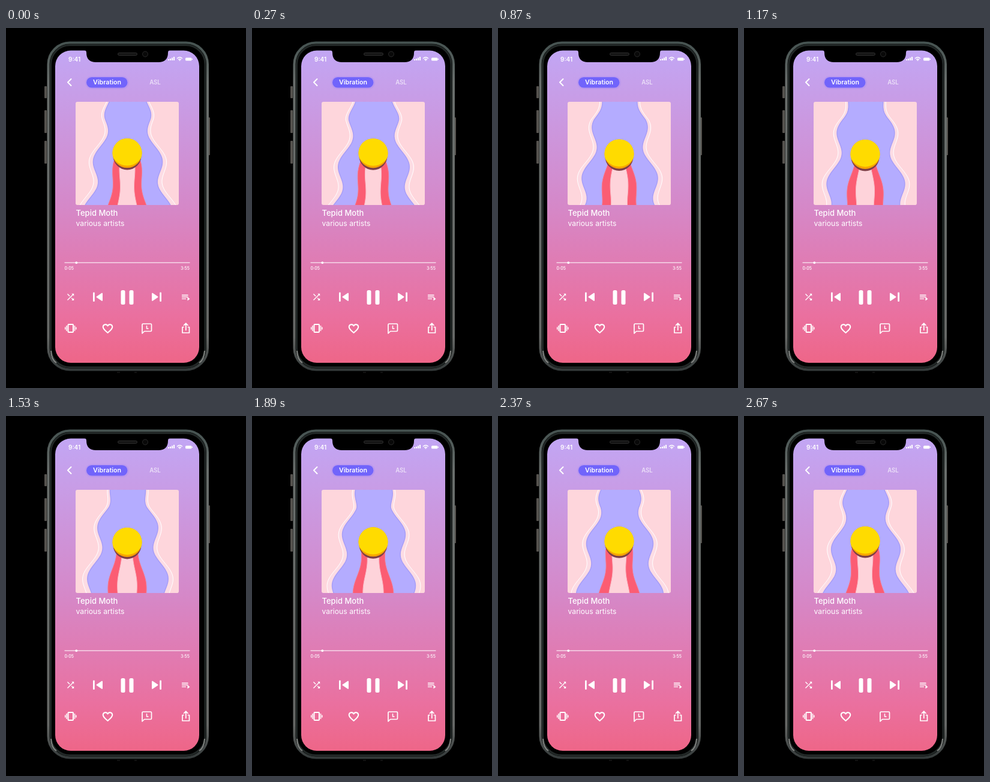
Animation of 400 by 600 pixels, one loop 2.7 s. Source, as an HTML page:

```html
<!DOCTYPE html>
<html lang="en">
<head>
<meta charset="utf-8">
<title>Music player</title>
<style>
  html, body { margin: 0; width: 100%; height: 100%; overflow: hidden; background: #000; }
  svg { display: block; width: 400px; height: 600px; }
  text { font-family: Inter, "Open Sans", sans-serif; fill: #fff; }
  .line { fill: none; stroke: #fff; stroke-width: 2; stroke-linecap: round; stroke-linejoin: round; }
</style>
</head>
<body>
<svg viewBox="0 0 400 600">
  <defs>
    <linearGradient id="sky" x2="0" y2="1">
      <stop stop-color="#c2a6f4"/>
      <stop offset=".5" stop-color="#d588c8"/>
      <stop offset=".85" stop-color="#ea709f"/>
      <stop offset="1" stop-color="#ee6688"/>
    </linearGradient>
    <linearGradient id="rim" x2="0" y2="1">
      <stop stop-color="#465351"/>
      <stop offset=".12" stop-color="#696e6c"/>
      <stop offset=".9" stop-color="#666866"/>
      <stop offset="1" stop-color="#353b3b"/>
    </linearGradient>
    <clipPath id="cover"><rect x="116" y="123" width="172" height="172" rx="3"/></clipPath>
    <clipPath id="disc"><circle cx="202" cy="0" r="24.5"/></clipPath>
  </defs>

  <!-- Phone -->
  <g fill="#55524e">
    <rect x="64" y="97" width="4" height="20" rx="1"/>
    <rect x="64" y="137" width="4" height="38" rx="1"/>
    <rect x="64" y="188" width="4" height="38" rx="1"/>
    <rect x="337" y="149" width="3" height="63" rx="1"/>
  </g>
  <rect x="70.5" y="24.5" width="265.5" height="545" rx="36" stroke="url(#rim)" stroke-width="4"/>
  <rect x="74.5" y="28.5" width="257.5" height="537" rx="32" fill="none" stroke="#222827" stroke-width="3"/>
  <path d="M75 538Q76 553 84 558M331 538Q330 553 322 558" fill="none" stroke="#858784" stroke-width="2"/>
  <path d="M185 574h5M214 574h4" stroke="#252525"/>
  <rect x="82" y="37.5" width="240" height="520.5" rx="26" fill="url(#sky)"/>
  <path d="M130 37q4 0 4 4q0 16 16 16h104q16 0 16-16q0-4 4-4z"/>
  <rect x="186.500" y="41.500" width="32" height="4" rx="2" fill="#111" stroke="#333"/>
  <circle cx="232" cy="43.500" r="4.500" fill="#090909" stroke="#2a2a2a"/>

  <!-- Status bar and tabs -->
  <text x="104" y="55.500" font-size="10" font-weight="600">9:41</text>
  <path d="M271 54v-2M274 54v-3M277 54v-4.500M280 54v-6" stroke="#fff" stroke-width="2"/>
  <path class="line" d="M285.500 50.500q4-3.500 8 0M287.500 52.500q2-1.500 4 0" stroke-width="1.400" style="stroke-width:1.4"/>
  <circle cx="289.500" cy="54" r="1" fill="#fff"/>
  <rect x="299" y="49.500" width="10.500" height="5" rx="1.500" fill="#fff"/>
  <path d="M310.500 51v2" stroke="#fff"/>
  <path class="line" d="M108.500 85l-5.500 5.500 5.500 5.500"/>
  <rect x="132" y="80" width="73" height="22" rx="11" fill="#8d78fa" opacity=".2"/>
  <rect x="134" y="82" width="68.500" height="17.500" rx="8.750" fill="#7164fb"/>
  <text x="168.500" y="94" font-size="10.700" font-weight="600" text-anchor="middle">Vibration</text>
  <text x="248.500" y="94" font-size="9.700" font-weight="600" text-anchor="middle" opacity=".65">ASL</text>

  <!-- Cover art -->
  <g clip-path="url(#cover)">
    <rect x="116" y="123" width="172" height="172" fill="#fed6dc"/>
    <path id="halo" fill="#fddce4" stroke="#fff" stroke-width="1"/>
    <path id="body" fill="#b4acff" stroke="#a79ef7" stroke-width="1.500"/>
    <path id="legs" fill="#fb5d73" stroke="#f4798f"/>
    <path id="gap" fill="#fed3da" stroke="#fbb6c3"/>
    <g id="ball">
      <circle cx="202" cy="4.500" r="23.500" fill="#7d3f46"/>
      <circle cx="202" cy="0" r="24.500" fill="#f7a500"/>
      <circle cx="202" cy="-6" r="27" fill="#ffdb00" clip-path="url(#disc)"/>
    </g>
  </g>
  <text x="116.500" y="313" font-size="13" font-weight="500">Tepid Moth</text>
  <text x="116.500" y="330" font-size="12.200">various artists</text>

  <!-- Progress -->
  <path d="M97.500 391.200H306.500" stroke="#fff" stroke-width="1.300" opacity=".85"/>
  <circle cx="117.300" cy="391.200" r="1.900" fill="#fff"/>
  <text x="97.500" y="402.500" font-size="7" font-weight="500">0:05</text>
  <text x="306" y="402.500" font-size="7" font-weight="500" text-anchor="end">3:55</text>

  <!-- Transport -->
  <g fill="#fff">
    <path transform="translate(99.200 440) scale(.7)" d="M10.590 9.170L5.410 4 4 5.410l5.170 5.170zM14.500 4l2.040 2.040L4 18.590 5.410 20 17.960 7.460 20 9.500V4zM14.830 13.410l-1.410 1.410 3.130 3.130L14.500 20H20v-5.500l-2.040 2.040z"/>
    <g id="skip">
      <rect x="145" y="440.500" width="2.800" height="15.500" rx="1"/>
      <path d="M160 442.500v11.500l-8.500-5.750z" stroke="#fff" stroke-width="2" stroke-linejoin="round"/>
    </g>
    <use href="#skip" transform="translate(404 0) scale(-1 1)"/>
    <rect x="191.500" y="437" width="7" height="24" rx="2.500"/>
    <rect x="205.500" y="437" width="7" height="24" rx="2.500"/>
    <path d="M293 444.500h10.500v1.400H293zM293 447.600h10.500v1.400H293zM293 450.700h7v1.400h-7zM302.500 448.500v6l4-3z"/>
  </g>

  <!-- Actions -->
  <g class="line">
    <rect x="103.500" y="494" width="8.500" height="13" rx="1"/>
    <path d="M101 496.500v8M98.700 499v3M114.500 496.500v8M116.800 499v3" style="stroke-width:1.5"/>
    <path d="M169.500 508C163.500 503 161.700 501 161.700 498A4.100 4.100 0 0 1 169.500 496.500A4.100 4.100 0 0 1 177.300 498C177.300 501 175.500 503 169.500 508z"/>
    <path d="M227 509v-14.500q0-1.500 1.500-1.500h12.500q1.500 0 1.500 1.500v9.500q0 1.500-1.500 1.500h-10.500z" style="stroke-width:1.7"/>
    <path d="M234.500 496.500v4.500h2.500" style="stroke-width:1.5"/>
    <path d="M296 498.500h-2v9.500h11.500v-9.500h-2M299.800 503.500v-11M296.500 495.500l3.300-3.300 3.300 3.300" style="stroke-width:1.7"/>
  </g>
</svg>
<script>
  const LOOP = 2700, WAVELENGTH = 85, TOP = 123, BOTTOM = 297;
  const el = id => document.getElementById(id);

  // Closed shape mirrored around cx, with the half width given for each y
  function column(cx, top, halfWidth) {
    const left = [], right = [];
    for (let y = top; y <= BOTTOM; y += 3) {
      const w = halfWidth(y);
      left.push(`${(cx - w).toFixed(2)} ${y}`);
      right.unshift(`${(cx + w).toFixed(2)} ${y}`);
    }
    return `M${left.concat(right).join("L")}Z`;
  }

  function draw(now) {
    const p = now % LOOP / LOOP;
    const wave = y => -Math.cos(2 * Math.PI * ((y - 176) / WAVELENGTH - p));
    const body = y => 30 + (y - TOP) * 0.2 + 8 * Math.min(1, 0.15 + (y - TOP) / 35) * wave(y);
    const legs = y => wave(y - 10);

    el("halo").setAttribute("d", column(203, TOP - 3, y => body(y) + 4.5 + (y - TOP) * 0.025));
    el("body").setAttribute("d", column(203, TOP - 3, body));
    el("legs").setAttribute("d", column(202, 222, y => 20 + (y - 225) * 0.16 + 3 * legs(y)));
    el("gap").setAttribute("d", column(202, 222, y => 10.5 + (y - 225) * 0.07 + 2 * legs(y)));
    el("ball").setAttribute("transform", `translate(0 ${209.5 - Math.cos(2 * Math.PI * p)})`);
    requestAnimationFrame(draw);
  }
  draw(performance.now());
</script>
</body>
</html>
```
